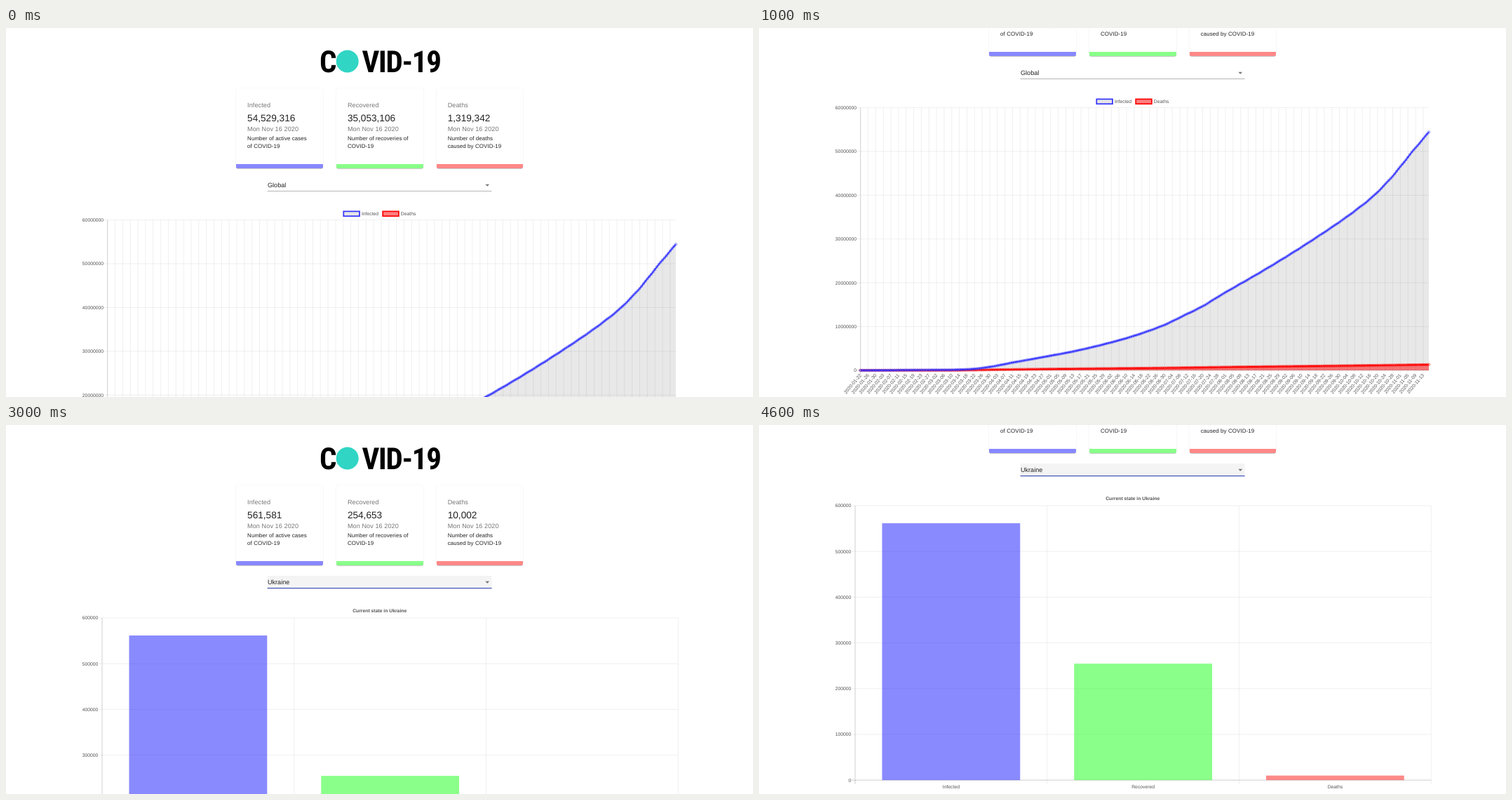
Recreate the animation shown at these times as an HTML page. Size 1065 by 526 pixels, loop 5000 ms.

```html
<!DOCTYPE html>
<html lang="en">
<head>
<meta charset="utf-8">
<title>COVID-19 tracker</title>
<style>
  html, body { margin: 0; width: 100%; height: 100%; overflow: hidden; background: #fff; }
  #stage { position: relative; width: 1065px; height: 526px; overflow: hidden; }
  #page { position: absolute; inset: 0 0 auto; height: 720px; }
  svg { position: absolute; left: 0; top: 0; overflow: visible; }
  .card {
    position: absolute; top: 86px; width: 123.5px; height: 114px; box-sizing: border-box;
    border-bottom: 6px solid; border-radius: 2.3px; background: #fff;
    box-shadow: 0 1.1px .6px -.6px #0003, 0 .6px .6px #0002, 0 .6px 1.7px #0002;
  }
  text {
    font-family: "Liberation Sans", Arial, sans-serif; fill: rgba(0, 0, 0, .87);
    text-rendering: geometricPrecision;
  }
  .logo { font: 700 43px "Roboto Condensed", Roboto, sans-serif; font-stretch: 75%; letter-spacing: -1.3px; fill: #000; }
  .body1 { font-size: 9.08px; letter-spacing: .085px; }
  .body2 { font-size: 7.95px; letter-spacing: .085px; }
  .grey { fill: rgba(0, 0, 0, .54); }
  .big { font-size: 13.63px; }
  .select { font-size: 9.08px; }
  .tick { font-size: 6.81px; fill: #555; }
  .title { font-weight: 700; }
  .grid { stroke: rgba(0, 0, 0, .11); stroke-width: .6; }
  .zero { stroke: rgba(0, 0, 0, .28); stroke-width: .7; }
  #menu {
    position: absolute; left: 367px; top: -10px; width: 320.5px; height: 533.5px;
    border-radius: 0 0 3.5px 3.5px; box-shadow: 0 0 1px #0006, 0 4px 11px #0004;
    background:
      radial-gradient(ellipse 45px 40px at 152px 80px, rgba(0, 0, 0, .018) 60%, transparent),
      radial-gradient(ellipse 70px 45px at 165px 130px, rgba(120, 255, 120, .03), transparent),
      radial-gradient(ellipse 50px 40px at 180px 200px, rgba(255, 100, 100, .03), transparent),
      radial-gradient(ellipse 140px 90px at 310px 510px, rgba(90, 90, 255, .035), transparent),
      #f1f1f1;
  }
  #menu text { font: 9.1px Roboto, "Open Sans", sans-serif; fill: #262626; }
  #menu text.on { fill: #fff; }
</style>
</head>
<body>
<div id="stage">
  <div id="page"><svg id="art" width="1065" height="720"></svg></div>
  <div id="menu"><svg id="list" width="320" height="533"></svg></div>
</div>
<script>
const $ = id => document.getElementById(id);
const page = $('page'), art = $('art');

function add(parent, tag, attrs, content) {
  const el = document.createElementNS('http://www.w3.org/2000/svg', tag);
  for (const key in attrs) el.setAttribute(key, attrs[key]);
  if (content !== undefined) el.textContent = content;
  return parent.appendChild(el);
}
const text = (parent, x, y, content, cls, anchor = 'start') =>
  add(parent, 'text', { x, y, class: cls, 'text-anchor': anchor }, content);
const line = (parent, x1, y1, x2, y2, cls = 'grid') =>
  add(parent, 'line', { x1, y1, x2, y2, class: cls });
const rect = (parent, x, y, width, height, attrs) =>
  add(parent, 'rect', { x, y, width, height, ...attrs });

const BLUE = 'rgba(0,0,255,.46)', GREEN = 'rgba(0,255,0,.46)', RED = 'rgba(255,0,0,.46)';

// Header
text(art, 447, 63, 'C', 'logo');
add(art, 'circle', { cx: 486.7, cy: 47.5, r: 16, fill: '#30d5c4' });
text(art, 507.5, 63, 'VID-19', 'logo');

// Cards
const cards = [
  ['Infected', 328.2, '#8888ff', 'Number of active cases', 'of COVID-19', '54,529,316', '561,581'],
  ['Recovered', 471, '#88ff88', 'Number of recoveries of', 'COVID-19', '35,053,106', '254,653'],
  ['Deaths', 613.8, '#ff8888', 'Number of deaths', 'caused by COVID-19', '1,319,342', '10,002'],
].map(([name, left, color, line1, line2, ...counts]) => {
  const box = document.createElement('div');
  box.className = 'card';
  box.style.left = left + 'px';
  box.style.borderBottomColor = color;
  page.insertBefore(box, art);
  const x = left + 15.9;
  text(art, x, 112.7, name, 'body1 grey');
  text(art, x, 147.4, 'Mon Nov 16 2020', 'body1 grey');
  text(art, x, 159.7, line1, 'body2');
  text(art, x, 171, line2, 'body2');
  return { count: text(art, x, 133.4, '', 'big'), counts };
});

// Country select
const focusFill = rect(art, 372.6, 215, 320, 17.5, { fill: 'rgba(0,0,0,.045)' });
const underline = rect(art, 372.6, 232, 320, .8);
const country = text(art, 373, 226.8, '', 'select');
add(art, 'path', { d: 'M683.4 222.8h5.7l-2.85 2.85z', fill: 'rgba(0,0,0,.54)' });

// World line chart
const world = add(art, 'g');
const left = 144.7, right = 955, top0 = 273.6, base = 648, row = (base - top0) / 6, day = (right - left) / 299;

for (let i = 0; i <= 6; i++) {
  const y = base - i * row;
  line(world, left - 5.7, y, right, y, i ? 'grid' : 'zero');
  text(world, left - 5.6, y + 2.4, i * 1e7, 'tick', 'end');
}
for (let d = 0; d <= 296; d += 4) {
  const x = left + d * day, y = base + 5.7;
  line(world, x, top0, x, y, d ? 'grid' : 'zero');
  const date = new Date(Date.UTC(2020, 0, 22 + d)).toISOString().slice(0, 10);
  const label = text(world, x, y + 2.4, date, 'tick', 'end');
  label.setAttribute('transform', `rotate(-50 ${x} ${y})`);
}

// Smooth curve through evenly spaced values, with a weekly reporting dip
function series(values, step) {
  const at = i => values[Math.max(0, Math.min(values.length - 1, i))];
  return Array.from({ length: 300 }, (_, d) => {
    const i = Math.floor(d / step), t = d / step - i;
    const [a, b, c, e] = [at(i - 1), at(i), at(i + 1), at(i + 2)];
    const smooth = b + t / 2 * (c - a + t * (2 * a - 5 * b + 4 * c - e + t * (3 * (b - c) + e - a)));
    const dip = .1 * (c - b) * 10 / step * Math.sin(2 * Math.PI * (d - 299) / 7) / 10;
    return [left + d * day, base - (smooth - dip) * row / 10];
  });
}
const pathOf = points => 'M' + points.map(p => p.map(v => v.toFixed(2)).join(' ')).join('L');
const area = (points, fill) =>
  add(world, 'path', { d: `${pathOf(points)}V${base}H${left}Z`, fill });
function curve(points, stroke) {
  add(world, 'path', { d: pathOf(points), fill: 'none', stroke, 'stroke-width': 1.7 });
  for (const [cx, cy] of points)
    add(world, 'circle', { cx, cy, r: 1.7, fill: 'none', stroke, 'stroke-width': .6 });
}
const infected = series([0, .01, .045, .076, .09, .13, .34, .93, 1.77, 2.55, 3.34, 4.15, 5.1, 6.17, 7.36, 8.77,
  10.4, 12.5, 14.65, 17.3, 19.8, 22.3, 24.9, 27.6, 30.4, 33.3, 36.4, 39.9, 44.4, 49.8, 54.95, 60.3], 10);
const dead = series([0, .003, .015, .17, .31, .41, .51, .64, .79, .91, 1.04, 1.17, 1.325, 1.5], 25);
area(infected, 'rgba(0,0,0,.09)');
area(dead, 'rgba(255,0,0,.5)');
curve(dead, '#f00');
curve(infected, '#33f');

[['Infected', 481.3, '#33f', 'rgba(0,0,0,.1)'], ['Deaths', 537.2, '#f00', 'rgba(255,0,0,.5)']]
  .forEach(([name, x, stroke, fill]) => {
    rect(world, x, 261.4, 22.7, 6.8, { stroke, fill, 'stroke-width': 1.7 });
    text(world, x + 25.6, 267.1, name, 'tick');
  });

// Country bar chart
const local = add(art, 'g');
const barLeft = 137, barRight = 958.3, barBase = 666.2, barRow = 65.2, slot = (barRight - barLeft) / 3;

text(local, 532.7, 267.4, 'Current state in Ukraine', 'tick title', 'middle');
for (let i = 0; i <= 6; i++) {
  const y = barBase - i * barRow;
  line(local, barLeft - 5.7, y, barRight, y, i ? 'grid' : 'zero');
  text(local, barLeft - 5.6, y + 2.4, i * 1e5, 'tick', 'end');
}
for (let i = 0; i <= 3; i++) {
  const x = barLeft + i * slot;
  line(local, x, barBase - 6 * barRow, x, barBase + 5.7, i ? 'grid' : 'zero');
}
[['Infected', 561581, BLUE], ['Recovered', 254653, GREEN], ['Deaths', 10002, RED]]
  .forEach(([name, value, fill], i) => {
    const height = value / 1e5 * barRow, middle = barLeft + (i + .5) * slot;
    rect(local, middle - 98.4, barBase - height, 196.8, height, { fill });
    text(local, middle, 678.2, name, 'tick', 'middle');
  });

// Open country menu
const countries = `Romania,Russia,Rwanda,Saint Kitts and Nevis,Saint Lucia,Saint Vincent and the Grenadines,
San Marino,Sao Tome and Principe,Saudi Arabia,Senegal,Serbia,Seychelles,Sierra Leone,Singapore,Slovakia,
Slovenia,Solomon Islands,Somalia,South Africa,South Sudan,Spain,Sri Lanka,Sudan,Suriname,Sweden,Switzerland,
Syria,Taiwan*,Tajikistan,Tanzania,Thailand,Timor-Leste,Togo,Trinidad and Tobago,Tunisia,Turkey,US,Uganda,
Ukraine,United Arab Emirates,United Kingdom,Uruguay`.split(/,\s*/);
const list = $('list');
rect(list, 0, 294.6, 320.5, 12.4, { fill: '#4796f8' });
add(add(list, 'clipPath', { id: 'rows' }), 'rect', { width: 320, height: 523.3 });
const rows = add(list, 'g', { 'clip-path': 'url(#rows)' });
countries.forEach((name, i) =>
  text(rows, 11.8, 19.4 + i * 12.335, name, name === 'Suriname' ? 'on' : ''));
add(list, 'path', { d: 'M157.4 525.8h5.8l-2.9 5z', fill: '#222' });

// One scene per second
const scenes = [
  { scroll: 0 },
  { scroll: 160.5 },
  { scroll: 74.2, focus: true, open: true },
  { scroll: 0, focus: true, ukraine: true },
  { scroll: 160.5, focus: true, ukraine: true },
];
let shown;
function frame() {
  const scene = scenes[Math.floor(performance.now() / 1000) % scenes.length];
  if (scene !== shown) {
    shown = scene;
    const { scroll, focus, open, ukraine } = scene;
    page.style.top = -scroll + 'px';
    $('menu').style.display = open ? '' : 'none';
    world.style.display = ukraine ? 'none' : '';
    local.style.display = ukraine ? '' : 'none';
    focusFill.style.display = focus ? '' : 'none';
    underline.setAttribute('height', focus ? 1.2 : .7);
    underline.setAttribute('fill', focus ? '#3f51b5' : 'rgba(0,0,0,.42)');
    country.textContent = ukraine ? 'Ukraine' : 'Global';
    for (const { count, counts } of cards) count.textContent = counts[ukraine ? 1 : 0];
  }
  requestAnimationFrame(frame);
}
frame();
</script>
</body>
</html>
```
